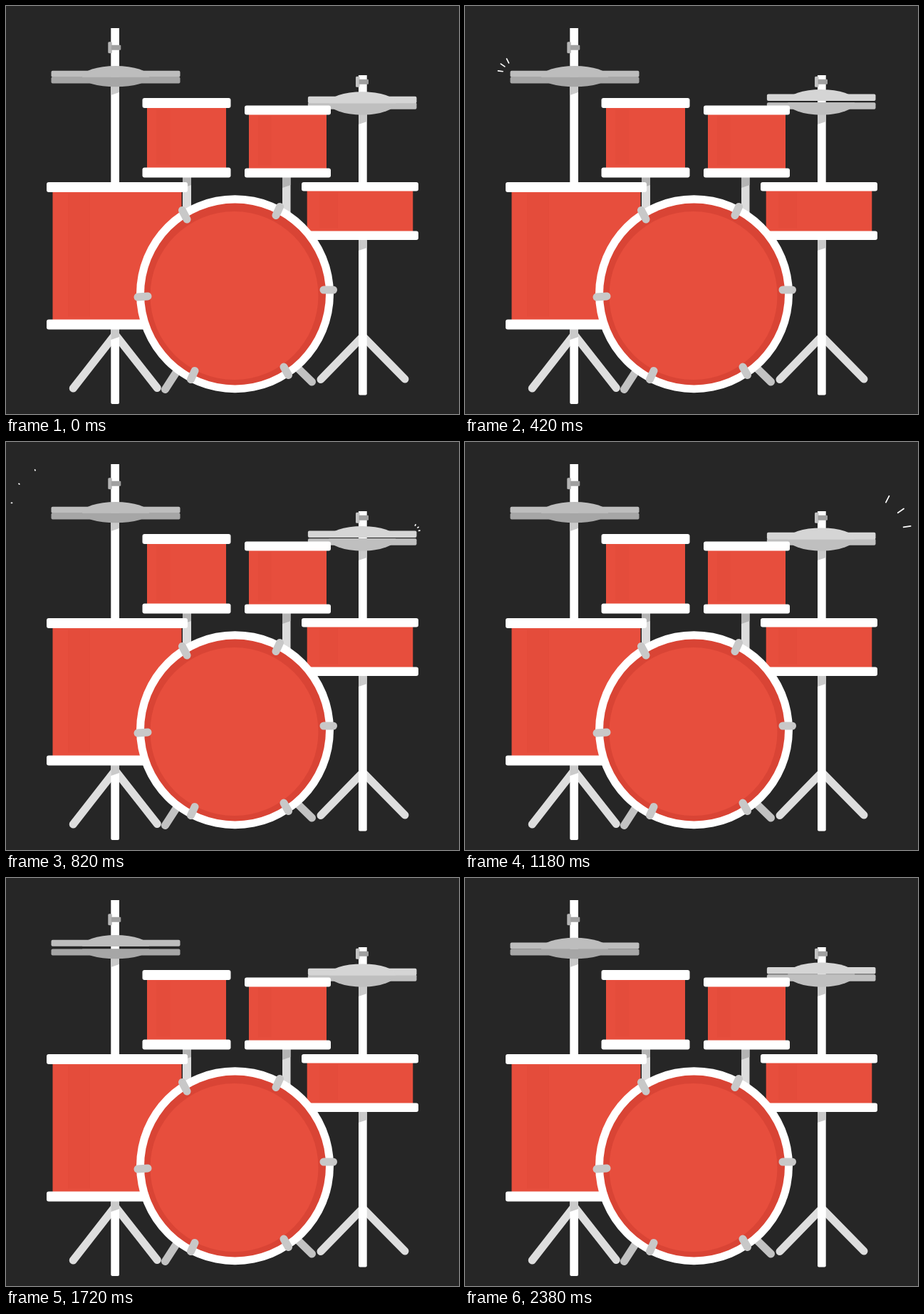
An HTML page for the animation above (2.4 s loop, 636 by 572 pixels).

```html
<!DOCTYPE html>
<html lang="en">
<head>
<meta charset="utf-8">
<title>Drum kit</title>
<style>
html, body { margin: 0; width: 100%; height: 100%; overflow: hidden; background: #262626; }
svg { display: block; width: 636px; height: 572px; }
.red { fill: #e74e3d; }
.white { fill: #fff; }
.shade { fill: #cacaca; }
.band { fill: #dc4838; opacity: .35; }
.leg, .lug, .foot { fill: none; stroke-linecap: round; stroke-width: 11; }
.leg { stroke: #dedede; }
.lug { stroke: #c8c8c8; }
.foot { stroke: #c2c2c2; }
.spark { stroke: #fff; stroke-width: 1.7; stroke-linecap: round; }
</style>
</head>
<body>
<svg viewBox="0 0 636 572" xmlns="http://www.w3.org/2000/svg">
  <g id="stands"></g>
  <g id="cymbals"></g>

  <!-- tom mounts -->
  <path fill="#dcdcdc" d="M248 238H260V295H248zM388 238H399.5V290H388z"/>
  <path fill="#b4b4b4" d="M248 238H260V251L248 255zM388 238H399.5V251L388 255z"/>

  <g id="drums"></g>

  <!-- bass drum -->
  <path class="foot" d="M240 512L223.5 537.5M407 505L429.5 527"/>
  <circle class="white" cx="321.5" cy="403.7" r="138.5"/>
  <circle cx="321.5" cy="404" r="127.5" fill="#d94435"/>
  <circle class="red" cx="320.5" cy="406" r="118"/>
  <path class="lug" d="M247.5 286.5L254 299M384.5 281.5L379 293.5M185 408L199 407M446 398L459.5 398M265 511.5L259.5 523.5M390 506L396.5 517.5"/>

  <g id="sparks"></g>
</svg>
<script>
const LOOP = 2400;
const byId = id => document.getElementById(id);
const clamp = v => Math.max(0, Math.min(1, v));

function add(parent, tag, attrs) {
  const el = document.createElementNS('http://www.w3.org/2000/svg', tag);
  for (const k in attrs) el.setAttribute(k, attrs[k]);
  return parent.appendChild(el);
}

const box = (parent, x, y, x2, y2, attrs) =>
  add(parent, 'rect', { x, y, width: x2 - x, height: y2 - y, ...attrs });

// pole with tripod legs, shadows and a clamp
function stand(x, top, cymbalY, drumY, fork, foot, grey) {
  const g = byId('stands'), l = x - 6, r = x + 5.7;
  add(g, 'path', { class: 'leg', d: `M${x - 59} ${foot - 22}L${x} ${fork}L${x + 59} ${foot - 22.5}` });
  box(g, l, top, r, drumY, { class: 'white' });
  box(g, l, drumY, r, foot, { class: 'white', rx: 2 });
  for (const y of [cymbalY, drumY])
    add(g, 'path', { class: 'shade', d: `M${l} ${y}H${r}v12l-11.7 4z` });
  return (y, h) => {
    box(g, l - 4, y - h, l + 1.5, y + h, { rx: 1.5, fill: grey });
    box(g, l + 0.5, y - 3.5, r + 2.3, y + 3.5, { rx: 1, fill: '#a0a0a0' });
  };
}

// half of a hi-hat: flat plate plus a half-ellipse bell, dir -1 is the upper one
function half(x, y, w, h, bell, dir, fill) {
  const g = add(byId('cymbals'), 'g', { fill });
  box(g, x - w, dir < 0 ? y - h : y, x + w, dir < 0 ? y : y + h, { rx: 2 });
  add(g, 'path', { d: `M${x - 47} ${y}A47 ${bell} 0 0 ${dir < 0 ? 1 : 0} ${x + 47} ${y}z` });
  return g;
}

function drum(l, r, t, b, rim, inset) {
  const g = byId('drums'), x = l + inset, w = r - inset - x;
  box(g, x, t + 5, x + w, b - 5, { class: 'red' });
  box(g, x + w * .12, t + rim + 2, x + w * .29, b - rim - 4, { class: 'band' });
  box(g, l, t, r, t + rim, { class: 'white', rx: 3 });
  box(g, l, b - rim, r, b, { class: 'white', rx: 3 });
}

stand(153.3, 31, 109, 452, 460.5, 558, '#b5b5b5')(58.3, 8);
stand(501, 97, 150, 327, 463, 545.5, '#c4c4c4')(106.3, 7.5);

half(154, 99.5, 90.5, 9, 13.7, 1, '#a6a6a6');
const topL = half(154, 99.7, 90.5, 9, 15.7, -1, '#bdbdbd');
half(500.2, 135.2, 76.3, 9.5, 17.5, 1, '#bfbfbf');
const topR = half(500.2, 136.4, 76.3, 9.6, 16, -1, '#d5d5d5');

drum(57, 255, 247, 453.5, 14, 8.5);
drum(191.5, 315.5, 129, 240.5, 14, 6.5);
drum(335, 456, 139.5, 240.5, 13, 6);
drum(415, 579, 247, 328, 12.5, 7.7);

// three sparks fanning out from the rim, side -1 is left
const fan = (cx, cy, side) => [8, 35, 63].map(deg => {
  const a = deg * Math.PI / 180, dx = side * Math.cos(a), dy = -Math.sin(a);
  const el = add(byId('sparks'), 'line', { class: 'spark' });
  return (tail, tip) => {
    el.style.display = tip > tail ? '' : 'none';
    [tail, tip].forEach((f, i) => {
      const r = 9.7 + 52 * f;
      el.setAttribute('x' + (i + 1), cx + dx * r);
      el.setAttribute('y' + (i + 1), cy + dy * r);
    });
  };
});

const sides = [
  { hit: 310, top: topL, sparks: fan(68.6, 93.9, -1) },
  { hit: 800, top: topR, sparks: fan(570, 125.7, 1) }
];

// opens slowly and snaps shut; skew moves the peak later
const hump = (p, start, length, height, skew, power) =>
  height * Math.sin(Math.PI * clamp((p - start) / length) ** skew) ** power || 0;

// one wide opening, then two smaller ones; the last closes on the accented hit
function lift(p) {
  if (p < 100) p += LOOP;
  if (p < 1608) return hump(p, 1200, 408, 9.7, 2.3, 2);
  return p < 2080 ? hump(p, 1608, 465, 6.5, 1.3, .8) : hump(p, 2090, 355, 6.5, 1.3, .8);
}

function draw(t) {
  for (const { hit, top, sparks } of sides) {
    const p = (t - hit + LOOP) % LOOP;
    top.setAttribute('transform', `translate(0 ${-lift(p)})`);
    const tip = clamp((p - 10) / 415), tail = clamp((p - 58) / 462);
    for (const move of sparks) move(tail, tip);
  }
}

const start = performance.now();
function tick() {
  draw((performance.now() - start) % LOOP);
  requestAnimationFrame(tick);
}
draw(0);
requestAnimationFrame(tick);
</script>
</body>
</html>
```
